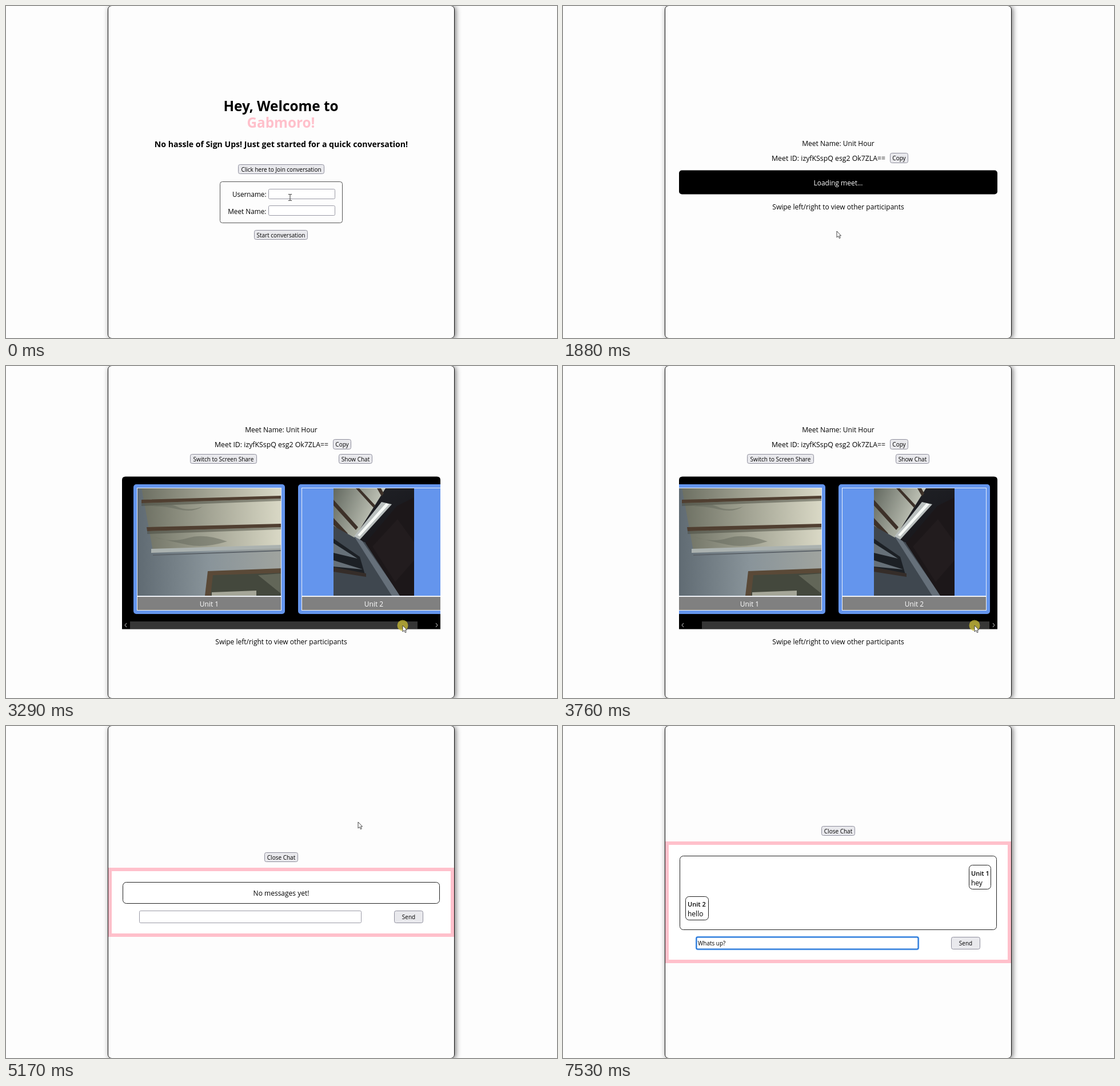
Write an HTML page that moves like this. It is 964 px wide and 581 px high and loops after 8000 ms.

```html
<!DOCTYPE html>
<html lang="en">
<head>
<meta charset="utf-8">
<title>Quick meeting demo</title>
<style>
html, body { margin: 0; width: 100%; height: 100%; overflow: hidden; background: #fdfdfd; }
#stage { position: relative; width: 964px; height: 581px; overflow: hidden; }
#page {
  position: absolute; left: 178px; top: -1px; width: 607px; height: 583px;
  box-sizing: border-box; border: 1px solid #111; border-radius: 7px;
  box-shadow: 2px 1px 10px rgba(0, 0, 0, .55);
}
svg { position: absolute; inset: 0; --h: 37px; }
[data-on] { visibility: hidden; }
[data-on].on { visibility: visible; }
text { font: 12px "Open Sans", "Noto Sans", sans-serif; fill: #000; white-space: pre; }
.mid { text-anchor: middle; }
.end { text-anchor: end; }
.title { font-size: 24.3px; font-weight: 700; }
.sub { font-size: 14.1px; font-weight: 700; }
.small, .btn text { font-size: 10px; }
.btn text { text-anchor: middle; }
.btn rect { fill: #e9e9ed; stroke: #8f8f9d; rx: 3px; }
.btn rect.over { fill: #d0d0d7; }
.field { fill: #fff; stroke: #9a9aa6; rx: 2px; }
.focus { fill: #fff; stroke: #1a6fd6; stroke-width: 2; rx: 2px; filter: drop-shadow(0 0 1px #6cb2ff); }
.white { fill: #fff; }
.name { font-size: 11px; font-weight: 600; }
.bubble { fill: #fff; stroke: #222; rx: 6px; }
#ask text { font-size: 9px; fill: #d5cfe6; }
#ask .strong { font-size: 8.8px; font-weight: 600; fill: #e9e5f4; }
#ask .dim { fill: #9d94b8; }
.live #info { transform: translateY(-129px); }
.live #swipe { transform: translateY(131px); }
#chat { transform: translateY(calc(291.5px - var(--h) / 2)); }
#log { height: var(--h); }
#frame { height: calc(var(--h) + 78px); }
#entry { transform: translateY(var(--h)); }
</style>
</head>
<body>
<div id="stage">
<div id="page"></div>
<svg id="art" width="964" height="581" viewBox="0 0 964 581">
  <defs>
    <clipPath id="strip"><rect x="203" y="193.5" width="557" height="267"/></clipPath>
    <clipPath id="photoA"><rect x="200" y="213" width="253" height="189"/></clipPath>
    <clipPath id="photoB"><rect x="544" y="214" width="141" height="188"/></clipPath>
    <linearGradient id="ceiling"><stop stop-color="#696c5f"/><stop offset=".5" stop-color="#a3a494"/><stop offset="1" stop-color="#dad9c6"/></linearGradient>
    <linearGradient id="wall"><stop stop-color="#5f6a72"/><stop offset=".5" stop-color="#89949a"/><stop offset="1" stop-color="#a0a49f"/></linearGradient>
    <linearGradient id="corner" x2="1" y2=".4"><stop stop-color="#62685f"/><stop offset="1" stop-color="#ced1c4"/></linearGradient>
    <linearGradient id="dusk" y2="1" x2=".4"><stop stop-color="#222429"/><stop offset="1" stop-color="#121014"/></linearGradient>
  </defs>

  <g data-on="0-3">
    <text class="title mid" x="481" y="184">Hey, Welcome to</text>
    <text class="title mid" x="481" y="213" style="fill:#ffc0cb">Gabmoro!</text>
    <text class="sub mid" x="481.5" y="247">No hassle of Sign Ups! Just get started for a quick conversation!</text>
    <g class="btn">
      <rect x="406.5" y="277.5" width="150" height="16"/>
      <text x="481.5" y="289.5">Click here to Join conversation</text>
    </g>
    <rect x="374.5" y="307.5" width="214" height="72" rx="4" fill="none" stroke="#555"/>
    <text class="end" x="455.5" y="334" style="font-size:11.7px">Username:</text>
    <text class="end" x="455.5" y="363.5" style="font-size:11.8px">Meet Name:</text>
    <rect class="field" x="459.5" y="320.5" width="116" height="17"/>
    <rect class="field" x="459.5" y="349.5" width="116" height="17"/>
    <rect class="focus" data-on="1-1" x="459" y="320" width="117" height="18"/>
    <rect class="focus" data-on="2-2" x="459" y="349" width="117" height="18"/>
    <text class="small" data-on="1-3" x="462.5" y="332.5">Unit 1</text>
    <text class="small" data-on="2-3" x="462.5" y="361.5">Unit Hour</text>
    <g class="btn">
      <rect x="434.5" y="392.5" width="93" height="16"/>
      <rect class="over" data-on="3-3" x="434.5" y="392.5" width="93" height="16"/>
      <text x="481" y="405">Start conversation</text>
    </g>
  </g>

  <g data-on="4-10">
    <g id="info">
      <text class="mid" x="481.5" y="244.5">Meet Name: Unit Hour</text>
      <text x="365" y="271" style="font-size:12.3px">Meet ID: izyfKSspQ esg2 Ok7ZLA==</text>
      <g class="btn">
        <rect x="572.5" y="257.5" width="31" height="17"/>
        <text x="588" y="270">Copy</text>
      </g>
    </g>
    <text id="swipe" class="mid" x="481.5" y="356">Swipe left/right to view other participants</text>
  </g>

  <g data-on="4-6">
    <rect x="203" y="287.5" width="557" height="42" rx="5"/>
    <text class="mid white" x="481.5" y="314">Loading meet...</text>
  </g>

  <g id="ask" data-on="5-6">
    <rect x="105.5" y="-8" width="302" height="154.5" rx="4" fill="#2b1b50" stroke="#4b3c78"/>
    <text class="strong" x="118" y="17">Allow</text>
    <text class="strong" x="333" y="17">to use your</text>
    <text class="strong" x="118" y="30">camera and microphone?</text>
    <path d="M120.5 45h7q1 0 1 1v6.5q0 1-1 1h-7q-1 0-1-1v-6.5q0-1 1-1zM128.500 48l2.500-2v7l-2.500-2" fill="none" stroke="#d5cfe6"/>
    <text x="137" y="52">HD WebCam</text>
    <text x="124.5" y="74">Microphone Array (Jelto® Broad Sound Technology (Jelto® BST))</text>
    <rect x="118.5" y="88.5" width="12" height="12" rx="1" fill="#32235a" stroke="#63578a"/>
    <text class="dim" x="136" y="98.5">Remember this decision</text>
    <rect x="291" y="109" width="49" height="25" rx="2" fill="#43366c"/>
    <rect data-on="6-6" x="291" y="109" width="49" height="25" rx="2" fill="#5c5088"/>
    <rect x="346" y="109" width="49" height="25" rx="2" fill="#3c2e64"/>
    <text class="strong mid" x="315.5" y="125"><tspan text-decoration="underline">A</tspan>llow</text>
    <text class="strong mid" x="370.5" y="125"><tspan text-decoration="underline">B</tspan>lock</text>
  </g>

  <g data-on="7-10">
    <g class="btn">
      <rect x="322.5" y="154.5" width="116" height="16"/>
      <text x="380.5" y="167">Switch to Screen Share</text>
      <rect x="582.5" y="154.5" width="58" height="16"/>
      <rect class="over" data-on="9-10" x="582.5" y="154.5" width="58" height="16"/>
      <text x="611.5" y="167">Show Chat</text>
    </g>
    <path d="M203 460.5V199.5q0-6 6-6h545q6 0 6 6v261z"/>
    <g clip-path="url(#strip)">
      <g id="cards">
        <g fill="#6495ed">
          <rect x="194" y="207" width="265" height="227" rx="5"/>
          <rect x="482" y="207" width="265" height="227" rx="5"/>
        </g>
        <g clip-path="url(#photoA)">
          <rect x="200" y="213" width="253" height="112" fill="url(#ceiling)"/>
          <path d="M200 213h8l20 110 225-7v90H200z" fill="url(#wall)"/>
          <path d="M208 234l245-7v5l-245 8zM217 282l236-6v6l-235 7z" fill="#503f31"/>
          <path d="M208 240l245-8v4l-245 9zM218 289l235-7v4l-235 8z" fill="#484b40" opacity=".5"/>
          <path d="M229 246q22-9 41 0t45 0q-17 11-42 5t-44-5zM229 299q32 11 60 2t69 6q-40 12-69 6t-60-14z" fill="#65695c" opacity=".5"/>
          <path d="M225 320l228-7v6l-228 8z" fill="#abb2b0"/>
          <path d="M228 330l225-8v2l-225 8z" fill="#5d646a"/>
          <path d="M324 359l129-5v48H319z" fill="#5a4937"/>
          <path d="M333 366l120-4v40H329z" fill="#44483d"/>
          <path d="M331 396l78-3v9h-78z" fill="#a5a698"/>
          <path d="M412 366l41-3v36z" fill="#777a6b" opacity=".6"/>
        </g>
        <g clip-path="url(#photoB)">
          <rect x="544" y="214" width="141" height="188" fill="url(#dusk)"/>
          <path d="M544 214h91l-55 88-36-22z" fill="url(#corner)"/>
          <path d="M583 214h6l28 30-3 4zM544 234l43 48-4 5-39-43zM620 214h7l5 9-4 5zM544 266l25 27-4 4-21-19z" fill="#3d3129"/>
          <path d="M628 238l18 4-57 63-9-7z" fill="#bac0bf"/>
          <path d="M636 240l5 2-51 56-4-2z" fill="#f7faf7"/>
          <path d="M544 280l36 20 20 9 60 93H544z" fill="#3f474f"/>
          <path d="M580 298l14 8 67 96h-15z" fill="#66707a"/>
          <path d="M544 302l46 32 10 34-56-12z" fill="#1c2025"/>
          <path d="M544 310l42 27-42-10zM544 340l51 16-51-5z" fill="#667078"/>
          <path d="M544 352l57 11v6l-57-9z" fill="#352d29"/>
          <path d="M600 310l55-65 30-15v172h-25z" fill="#1c1719"/>
          <path d="M612 316l44-48 29 40v32l-33 38z" fill="#221c1e"/>
        </g>
        <g fill="none" stroke="#e8eef8">
          <rect x="200.5" y="213.5" width="252" height="189"/>
          <rect x="488.5" y="213.5" width="252" height="189"/>
        </g>
        <g fill="#808080" stroke="#f4f4f4">
          <rect x="200.5" y="403.5" width="252" height="24"/>
          <rect x="488.5" y="403.5" width="252" height="24"/>
        </g>
        <text class="mid white" x="326.5" y="420.5">Unit 1</text>
        <text class="mid white" x="614.5" y="420.5">Unit 2</text>
      </g>
      <rect id="thumb" x="243" y="447" width="503" height="13" fill="#363636"/>
      <path d="M211 450l-3 3.500 3 3.500M752 450l3 3.500-3 3.500" fill="none" stroke="#8a8a8a" stroke-width="1.2"/>
    </g>
  </g>

  <g id="chat" data-on="11-16">
    <g class="btn">
      <rect x="452.5" y="-51.5" width="58" height="16"/>
      <text x="481.5" y="-39">Close Chat</text>
    </g>
    <rect id="frame" x="182" y="-22" width="599" fill="#fff" stroke="#ffc0cb" stroke-width="6"/>
    <rect id="log" x="204.5" y=".5" width="554" rx="6" fill="#fff" stroke="#222"/>
    <text class="mid" data-on="11-13" x="481.5" y="24">No messages yet!</text>
    <g data-on="14-16">
      <rect class="bubble" x="710.5" y="16.5" width="38" height="42"/>
      <text class="name" x="714" y="34.5">Unit 1</text>
      <text x="714" y="51.5">hey</text>
    </g>
    <g data-on="15-16">
      <rect class="bubble" x="214.5" y="71.5" width="40" height="41"/>
      <text class="name" x="218" y="88.5">Unit 2</text>
      <text x="218" y="105.5">hello</text>
    </g>
    <g id="entry">
      <rect class="field" x="233.5" y="13.5" width="388" height="21"/>
      <rect class="focus" data-on="12-16" x="233.5" y="13.5" width="388" height="21"/>
      <path data-on="12-12 14-15" d="M236.5 18v12" stroke="#222"/>
      <text class="small" data-on="13-13" x="236" y="27.5">hey</text>
      <text class="small" data-on="16-16" x="236" y="27.5">Whats up?</text>
      <g class="btn">
        <rect x="679.5" y="13.5" width="50" height="21"/>
        <text x="704.5" y="28">Send</text>
      </g>
    </g>
  </g>

  <g id="pointer">
    <circle data-on="6-8 10-10" r="9.5" fill="#cdbf36" opacity=".75"/>
    <path data-on="2-11" d="M0 0V11L2.600 8.600 4.400 12.600 6.200 11.800 4.500 8H7.500Z" fill="#fff" stroke="#333" stroke-width=".9"/>
    <path data-on="0-0 12-12" d="M-3-5.500h2.200l.8.600.8-.600H3M0-5V5M-3 5.500h2.200l.8-.600.8.600H3" fill="none" stroke="#333"/>
  </g>
</svg>
</div>
<script>
const $ = id => document.getElementById(id);
const art = $('art');
const LOOP = 8000, BEAT = 470, LAST = 7530;

// Pointer position from each step on
const stops = [
  [0, 497, 335], [2, 505, 371], [3, 479, 394], [6, 328, 112], [7, 694, 454],
  [8, 720, 454], [9, 606, 161], [10, 616, 168], [12, 530, 332]
];

const parts = [...art.querySelectorAll('[data-on]')].map(el => ({
  el, spans: el.dataset.on.split(' ').map(s => s.split('-').map(Number))
}));

const active = (spans, step) => spans.some(([from, to]) => step >= from && step <= to);

let shown = -1;

function show(step) {
  for (const { el, spans } of parts) el.classList.toggle('on', active(spans, step));
  art.classList.toggle('live', step >= 7);
  const dragged = step > 7;
  $('cards').setAttribute('transform', `translate(${dragged ? 0 : 29})`);
  $('thumb').setAttribute('x', dragged ? 243 : 217);
  art.style.setProperty('--h', (step < 14 ? 37 : step < 15 ? 75 : 129) + 'px');
  const [, x, y] = stops.filter(s => s[0] <= step).pop();
  $('pointer').setAttribute('transform', `translate(${x} ${y})`);
}

function tick() {
  const t = performance.now() % LOOP;
  const step = t >= LAST ? 16 : Math.min(15, Math.floor(t / BEAT));
  if (step !== shown) show(shown = step);
  requestAnimationFrame(tick);
}
tick();
</script>
</body>
</html>
```
